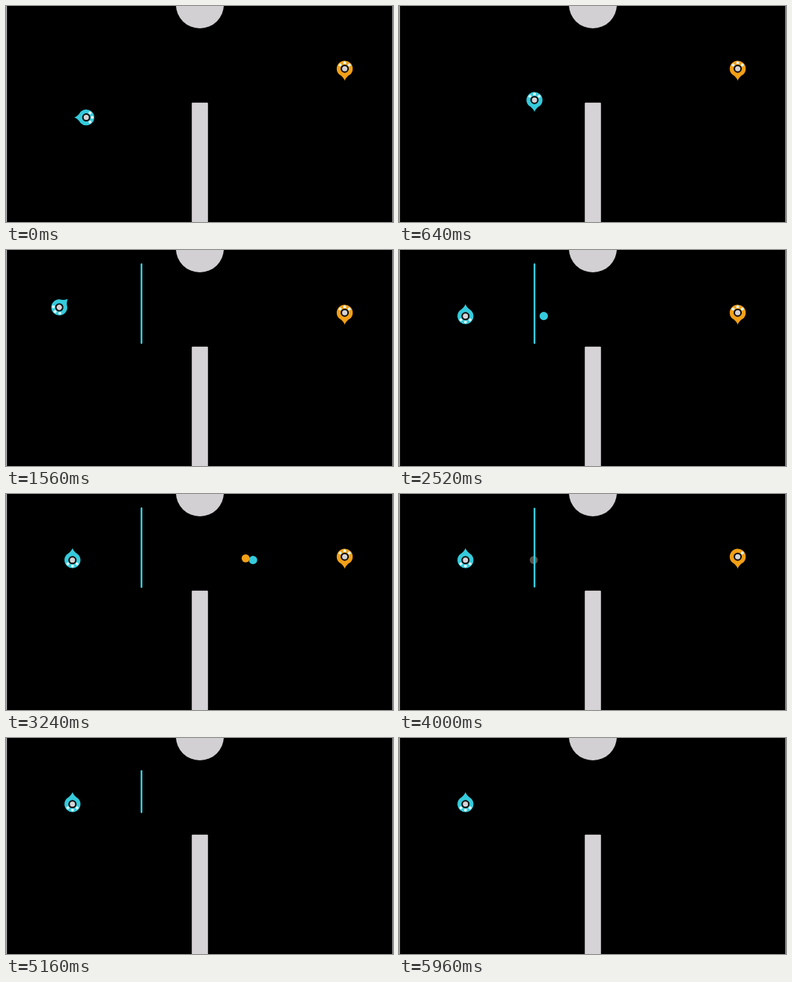
These frames come from a looping animation (517x290 px, 6000 ms). An HTML page with a canvas:

```html
<!DOCTYPE html>
<html lang="en">
<head>
<meta charset="utf-8">
<title>Wall duel</title>
<style>
  html, body { margin: 0; width: 100%; height: 100%; overflow: hidden; background: #000; }
  canvas { display: block; }
</style>
</head>
<body>
<canvas id="stage" width="517" height="290"></canvas>
<script>
const ctx = document.getElementById('stage').getContext('2d');
const LOOP = 6000, STEP = 40;
const CYAN = '#35cbdc', ORANGE = '#f2a016', PALE = '#d6d3d6';
const WALL = { x: 181, top: 18, bottom: 126, start: 640, drawn: 1030, fade: 3820, end: 5780 };
const RIVAL = { x: 452.5, y: 84.2 };

// time, x, y, heading in degrees
const route = [
  [0, 107.2, 149.6, 0], [240, 138, 149.6, -10], [460, 167, 142, -45],
  [640, 181, 126.2, -90], [820, 181, 75, -90], [1000, 178, 24, -100],
  [1080, 163, 11.5, -155], [1160, 142, 13, -190], [1280, 108, 31, -220],
  [1560, 71.2, 77, -225], [1720, 69, 86, -255], [1920, 84, 88.6, -270],
  [2520, 88.8, 88.8, -270]
];

const clamp = (v, a = 0, b = 1) => Math.min(b, Math.max(a, v));
const progress = (t, a, b) => clamp((t - a) / (b - a));
const mix = (a, b, u) => a + (b - a) * u;

function slope(i, k) {
  if (i === route.length - 1) return 0;
  const a = route[Math.max(0, i - 1)], b = route[i + 1];
  return (b[k] - a[k]) / (b[0] - a[0]);
}

function pose(t) {
  const last = route.length - 1;
  if (t >= route[last][0]) return route[last].slice(1);
  const i = route.findIndex((p, n) => t < route[n + 1][0]);
  const a = route[i], b = route[i + 1], d = b[0] - a[0], u = (t - a[0]) / d;
  const curve = k => {
    const m = slope(i, k) * d, n = slope(i + 1, k) * d;
    return (2 * u ** 3 - 3 * u * u + 1) * a[k] + (u ** 3 - 2 * u * u + u) * m +
           (3 * u * u - 2 * u ** 3) * b[k] + (u ** 3 - u * u) * n;
  };
  return [curve(1), curve(2), mix(a[3], b[3], u)];
}

function disc(x, y, r, color) {
  ctx.fillStyle = color;
  ctx.beginPath();
  ctx.arc(x, y, r, 0, Math.PI * 2);
  ctx.fill();
}

function ship(x, y, heading, color, scale = 1, lost = 0) {
  if (scale <= 0) return;
  ctx.save();
  ctx.translate(x, y);
  ctx.rotate(heading * Math.PI / 180);
  ctx.scale(scale, scale);
  ctx.fillStyle = color;
  ctx.beginPath();
  ctx.arc(0, 0, 10.7, -2.4, 2.4);
  ctx.quadraticCurveTo(-10.6, 2.2, -16, 0);
  ctx.quadraticCurveTo(-10.6, -2.2, -7.9, -7.2);
  ctx.fill();
  [-0.88, 0, 0.88].slice(lost).forEach(a =>
    disc(7.9 * Math.cos(a), 7.9 * Math.sin(a), 2, '#dcf4f4'));
  disc(0, 0, 5.5, '#0a0a0a');
  disc(0, 0, 3.5, PALE);
  ctx.restore();
}

function scenery() {
  ctx.fillStyle = '#000';
  ctx.fillRect(0, 0, 517, 290);
  ctx.fillStyle = '#c6c4c6';
  ctx.fillRect(0, 0, 1.2, 290);
  ctx.fillStyle = '#a09ea0';
  ctx.fillRect(516, 0, 1, 290);
  disc(259, -2, 32, '#d2d0d3');
  ctx.fillStyle = PALE;
  ctx.beginPath();
  ctx.roundRect(248.2, 129.8, 21.6, 165, 1);
  ctx.fill();
}

function wall(t, y) {
  if (t <= WALL.start || t >= WALL.end) return;
  const top = t < WALL.drawn ? Math.max(WALL.top, y) : WALL.top;
  const cut = 54 * progress(t, WALL.fade, WALL.end) ** 2;
  ctx.fillStyle = CYAN;
  ctx.beginPath();
  ctx.roundRect(WALL.x - 1.2, top + cut, 2.4, Math.max(0, WALL.bottom - top - 2 * cut), 1);
  ctx.fill();
}

function shots(t) {
  if (t >= 1970 && t < 3830) {
    const u = progress(t, 1970, 3830);
    disc(mix(89, 442, u), 88.6, 5.6, CYAN);
  }
  if (t >= 2560 && t < 4120) {
    const u = progress(t, 2560, 3960);
    ctx.globalAlpha = 1 - progress(t, 3960, 4120);
    disc(mix(RIVAL.x, 180, u), mix(RIVAL.y, 88.6, u), 5.4, t < 3960 ? ORANGE : '#776d64');
    ctx.globalAlpha = 1;
  }
}

function rival(t) {
  const lost = [3840, 3960, 4080].filter(hit => t >= hit).length;
  const u = progress(t, 4120, 4440);
  const scale = 1 - (2.4 * u ** 3 - 1.4 * u * u);
  ship(RIVAL.x, RIVAL.y, -90, ORANGE, u < 1 ? scale : 0, lost);
}

function draw(t) {
  const [x, y, heading] = pose(t);
  scenery();
  shots(t);
  wall(t, y);
  rival(t);
  ship(x, y, heading, CYAN);
}

const start = performance.now();
function tick() {
  const t = (performance.now() - start) % LOOP;
  draw(Math.floor(t / STEP) * STEP);
  requestAnimationFrame(tick);
}
tick();
</script>
</body>
</html>
```
